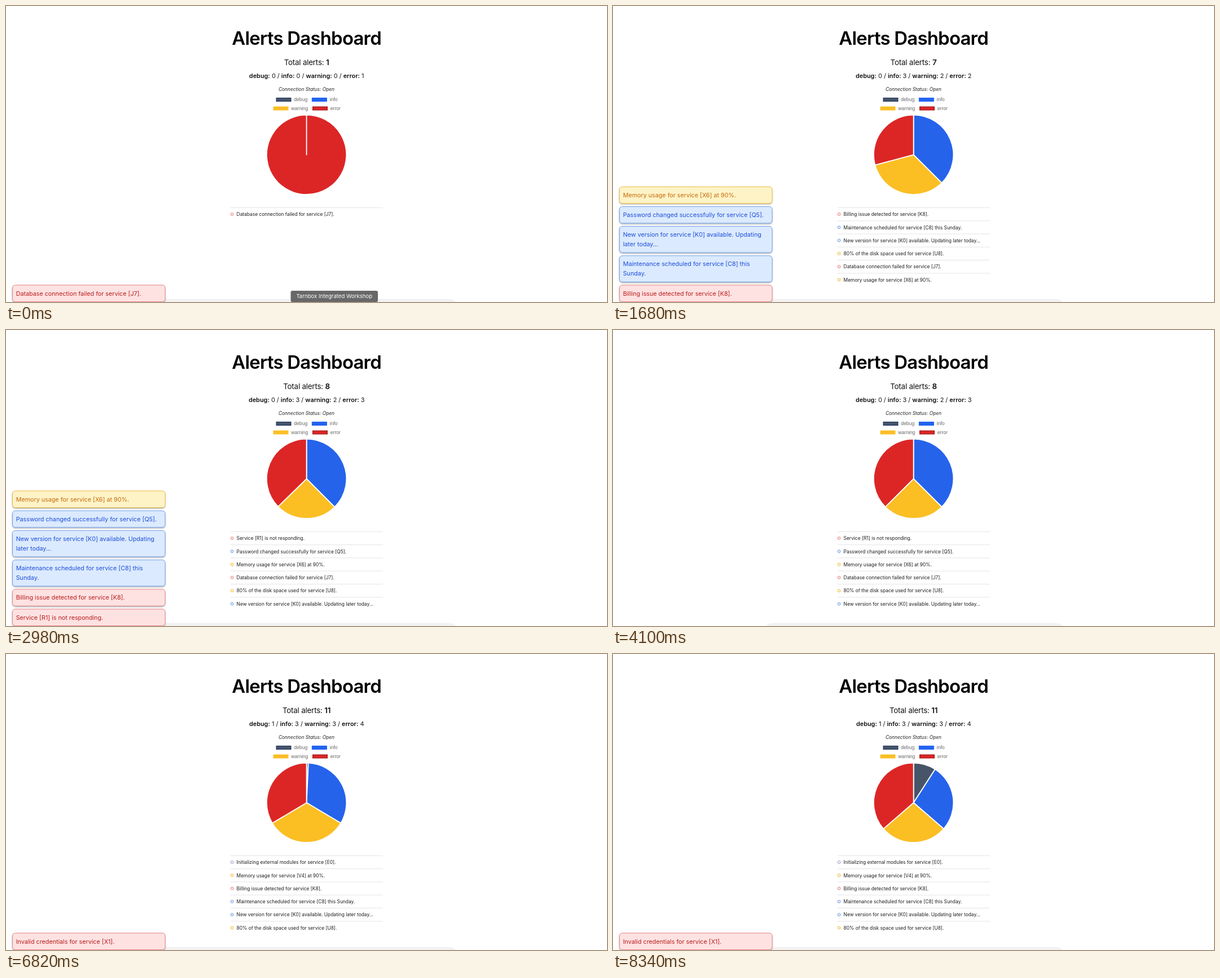
These frames come from a looping animation (1065x526 px, 8440 ms). An HTML page:

```html
<!DOCTYPE html>
<html lang="en">
<head>
<meta charset="utf-8">
<title>Alerts Dashboard</title>
<style>
  html, body { margin: 0; width: 100%; height: 100%; overflow: hidden; background: #fff; }
  svg { display: block; width: 100%; height: 100%; font-family: Inter, "Noto Sans", sans-serif; }
  text { white-space: pre; }
  .mid { text-anchor: middle; }
  .bold { font-weight: 600; }
  .title { font-size: 32.9px; font-weight: 600; letter-spacing: -.76px; }
  .total { font-size: 13.4px; letter-spacing: -.22px; fill: #111; }
  .counts { font-size: 10.9px; fill: #111; }
  .status { font-size: 8.4px; font-style: italic; fill: #222; }
  .legend { font: 8.6px "Liberation Sans", Arial, sans-serif; fill: #666; }
  .row { font-size: 8.39px; fill: #1c1c1c; }
  .toast { font-size: 10.74px; }
  .tip { font-size: 9.6px; fill: #fff; }
</style>
</head>
<body>
<svg viewBox="0 0 1065 526" preserveAspectRatio="xMidYMid meet">
  <defs>
    <filter id="shadow" x="-5%" y="-20%" width="110%" height="150%">
      <feDropShadow dx="0" dy="1.3" stdDeviation="1" flood-color="#000" flood-opacity=".36"/>
    </filter>
  </defs>
  <rect x="264" y="520.5" width="540" height="40" rx="20" fill="#f2f2f2"/>
  <text class="title" x="400.3" y="69.2">Alerts Dashboard</text>
  <text class="status mid" x="532.5" y="150.8">Connection Status: Open</text>
  <g id="legend"></g>
  <g id="live"></g>
</svg>
<script>
const LOOP = 8440, CHART_LAG = 20, CHART_MS = 1000, FADE = 100;
const CX = 532.6, CY = 264.3, R = 70.7;

const KINDS = {
  debug:   { pie: '#475569', edge: '#1e3260', fill: '#f1f5f9', line: '#94a3b8', text: '#334155' },
  info:    { pie: '#2563eb', edge: '#1663ff', fill: '#dbeafe', line: '#74a0e6', text: '#1d4ed8' },
  warning: { pie: '#fbbf24', edge: '#fbbf24', fill: '#fef3c7', line: '#f0bd45', text: '#c56a08' },
  error:   { pie: '#dc2626', edge: '#a31313', fill: '#fee2e2', line: '#ea8585', text: '#b91c1c' }
};
const NAMES = Object.keys(KINDS);

// kind, text ("|" breaks the line in a toast), toast shown from / until
const ALERTS = {
  J7: ['error', 'Database connection failed for service [J7].', 0, 1660],
  X6: ['warning', 'Memory usage for service [X6] at 90%.', 195, 3150],
  U8: ['warning', '80% of the disk space used for service [U8].', 195, 1255],
  Q5: ['info', 'Password changed successfully for service [Q5].', 1255, 3150],
  K0: ['info', 'New version for service [K0] available. Updating|later today...', 1255, 3150],
  C8: ['info', 'Maintenance scheduled for service [C8] this|Sunday.', 1255, 3150],
  K8: ['error', 'Billing issue detected for service [K8].', 1255, 3150],
  R1: ['error', 'Service [R1] is not responding.', 2316, 3150],
  V4: ['warning', 'Memory usage for service [V4] at 90%.', 5560, 6760],
  X1: ['error', 'Invalid credentials for service [X1].', 6780, Infinity],
  E0: ['debug', 'Initializing external modules for service [E0].']
};

// time, counts per kind, visible list
const STATES = [
  [0,    [0, 0, 0, 1], 'J7'],
  [195,  [0, 0, 2, 1], 'U8 J7 X6'],
  [1255, [0, 3, 2, 2], 'K8 C8 K0 U8 J7 X6'],
  [2316, [0, 3, 2, 3], 'R1 Q5 X6 J7 U8 K0'],
  [5560, [0, 3, 3, 3], 'V4 K8 C8 K0 U8 J7'],
  [6780, [1, 3, 3, 4], 'E0 V4 K8 C8 K0 U8']
];

// label, left, right, from, until
const TIPS = [
  ['Tarnbox Integrated Workshop', 504.5, 659, 0, 200],
  ['Trash', 763, 808.5, 900, 1500]
];

const clamp = x => Math.min(1, Math.max(0, x));
const easeOutQuart = x => 1 - (1 - x) ** 4;
const sum = a => a.reduce((x, y) => x + y, 0);
const shares = counts => counts.map(n => n / sum(counts));
const label = (cls, x, y, s, extra = '') => `<text class="${cls}" x="${x}" y="${y}" ${extra}>${s}</text>`;
const bold = s => `<tspan class="bold">${s}</tspan>`;

function legend() {
  const spots = [[479.1, 163.5], [542.5, 163.5], [474.1, 179.1], [543.6, 179.1]];
  return NAMES.map((name, i) => {
    const [x, y] = spots[i], k = KINDS[name];
    return `<rect x="${x}" y="${y}" width="25.8" height="5.8" fill="${k.pie}" stroke="${k.edge}" stroke-width="1.2"/>`
      + label('legend', x + 31.2, y + 5.8, name);
  }).join('');
}

function pie(parts) {
  const point = turn => {
    const r = turn * 2 * Math.PI;
    return `${(CX + R * Math.sin(r)).toFixed(2)} ${(CY - R * Math.cos(r)).toFixed(2)}`;
  };
  let a = 0;
  return parts.map((part, i) => {
    if (part < 1e-4) return '';
    const end = a + Math.min(part, .9999);
    const d = `M${CX} ${CY}L${point(a)}A${R} ${R} 0 ${part > .5 ? 1 : 0} 1 ${point(end)}Z`;
    a += part;
    return `<path d="${d}" fill="${KINDS[NAMES[i]].pie}" stroke="#fff" stroke-width="1.8" stroke-linejoin="round"/>`;
  }).join('');
}

function list(ids) {
  return ids.map((id, i) => {
    const [kind, text] = ALERTS[id], k = KINDS[kind], y = 358.4 + i * 23.3;
    return `<path d="M398 ${y}H668" stroke="#e3e5e8"/>`
      + `<circle cx="400.6" cy="${y + 11.6}" r="2.5" fill="${k.fill}" stroke="${k.line}"/>`
      + label('row', 408.6, y + 14.8, text.replace('|', ' '));
  }).join('');
}

// newest toast at the bottom
function toasts(t) {
  let bottom = 525.5, out = '';
  for (const [kind, text, from, until] of Object.values(ALERTS).reverse()) {
    if (!(t >= from && t < until)) continue;
    const k = KINDS[kind], lines = text.split('|');
    const h = 29.5 + (lines.length - 1) * 17, y = bottom - h;
    out += `<g opacity="${clamp((until - t) / FADE)}"><rect x="11.5" y="${y}" width="270.5" height="${h}" rx="5" fill="${k.fill}" stroke="${k.line}" filter="url(#shadow)"/>`
      + lines.map((s, i) => label('toast', 17.7, y + 18.5 + i * 17, s, `fill="${k.text}"`)).join('') + '</g>';
    bottom = y - 5.7;
  }
  return out;
}

function tips(t) {
  return TIPS.filter(([, , , from, until]) => t >= from && t < until).map(([s, l, r]) =>
    `<rect x="${l}" y="506" width="${r - l}" height="20" rx="3" fill="#686868"/>`
    + label('tip mid', (l + r) / 2, 519.4, s)).join('');
}

const live = document.getElementById('live');
document.getElementById('legend').innerHTML = legend();

function draw(t) {
  const n = STATES.filter(s => t >= s[0]).length - 1;
  const [start, counts, ids] = STATES[n];
  const prev = shares(STATES[Math.max(0, n - 1)][1]), next = shares(counts);
  const p = easeOutQuart(clamp((t - start - CHART_LAG) / CHART_MS));
  live.innerHTML =
    label('total mid', 532.5, 105.3, 'Total alerts: ' + bold(sum(counts)))
    + label('counts mid', 532.7, 128.4, NAMES.map((s, i) => `${bold(s + ':')} ${counts[i]}`).join(' / '))
    + pie(next.map((v, i) => prev[i] + (v - prev[i]) * p))
    + list(ids.split(' ')) + toasts(t) + tips(t);
}

const t0 = performance.now();
function tick(now) {
  draw(Math.max(0, now - t0) % LOOP);
  requestAnimationFrame(tick);
}
draw(0);
requestAnimationFrame(tick);
</script>
</body>
</html>
```
